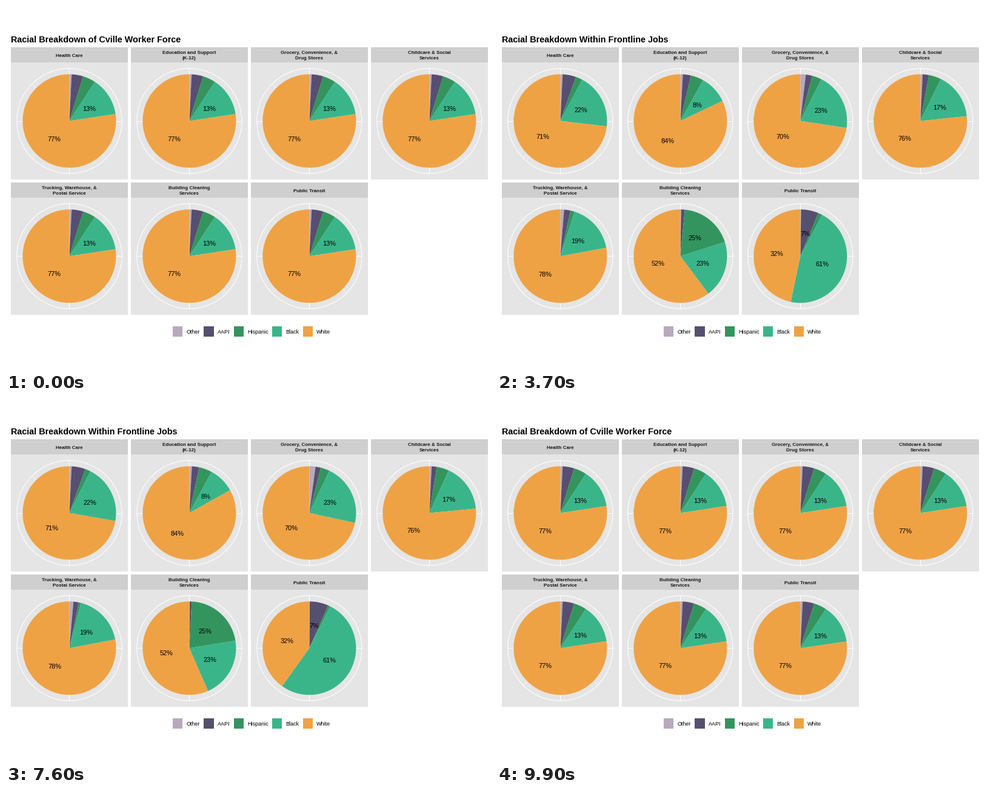
Recreate the animation shown at these times as a matplotlib script. Size 800 px wide and 600 px high, loop 10000 ms.

```python
import numpy as np
import matplotlib.pyplot as plt
from matplotlib.animation import FuncAnimation
from matplotlib.patches import Polygon, Rectangle

plt.rcParams["font.family"] = "Liberation Sans"
PT = 0.72  # points per pixel at 100 dpi

FRAMES, INTERVAL = 100, 100
OUT_START, OUT_END, BACK_START = 16, 50, 67
TITLES = ("Racial Breakdown of Cville Worker Force",
          "Racial Breakdown Within Frontline Jobs")

GROUPS = {"Other": "#b8a9bd", "AAPI": "#574f6f", "Hispanic": "#33955d",
          "Black": "#3ab58a", "White": "#efa244"}
COLORS = list(GROUPS.values())

# Shares in percent for all groups but the last, which takes the rest
OVERALL = (0.8, 4.0, 4.4, 13.4)
JOBS = {
    "Health Care": (0.8, 4.9, 1.35, 21.75),
    "Education and Support\n(K-12)": (0.9, 2.2, 4.5, 8.1),
    "Grocery, Convenience, &\nDrug Stores": (2.4, 1.35, 2.85, 23.0),
    "Childcare & Social\nServices": (0.8, 1.3, 4.2, 17.4),
    "Trucking, Warehouse, &\nPostal Service": (1.55, 1.35, 0, 19.0),
    "Building Cleaning\nServices": (0, 0, 25.2, 22.6),
    "Public Transit": (0, 7.0, 0, 60.7),
}

SIZE, STRIP, GAP = 192.44, 24.9, 5.5
LEFT, TOP = 8.25, 68.4
R_PIE, R_GRID, R_LABEL = 77, 86.6, 38.5
MIN_LABEL = 6

fig = plt.figure(figsize=(8, 6), dpi=100, facecolor="white")
ax = fig.add_axes([0, 0, 1, 1])
ax.set_xlim(0, 800)
ax.set_ylim(600, 0)
ax.axis("off")


def rect(x, y, w, h, color):
    ax.add_patch(Rectangle((x, y), w, h, fc=color, lw=0))


def text(x, y, s, px, **kw):
    return ax.text(x, y, s, fontsize=px * PT, va="baseline", **kw)


def polar(cx, cy, r, share):
    """Points at a share (0..1) of a clockwise turn from the top."""
    a = 2 * np.pi * np.asarray(share)
    return cx + r * np.sin(a), cy - r * np.cos(a)


def sector(cx, cy, start, end):
    x, y = polar(cx, cy, R_PIE, np.linspace(start, end, 90))
    return np.column_stack([np.append(x, cx), np.append(y, cy)])


def bounds(shares):
    return np.array([0, *np.cumsum(shares), 100]) / 100


def percents(edges):
    shares = np.diff(edges) * 100
    return [f"{s:.0f}%" if s >= MIN_LABEL else "" for s in shares]


class Pie:
    def __init__(self, col, row, name, shares):
        x = LEFT + col * (SIZE + GAP)
        y = TOP + row * (SIZE + STRIP + GAP)
        self.cx, self.cy = x + SIZE / 2, y + STRIP + SIZE / 2
        self.edges = bounds(OVERALL), bounds(shares)
        self.words = [percents(e) for e in self.edges]

        rect(x, y, SIZE, STRIP, "#cfcfcf")
        rect(x, y + STRIP, SIZE, SIZE, "#e5e5e5")
        lines = name.split("\n")
        for i, line in enumerate(lines):
            dy = (i - (len(lines) - 1) / 2) * 8.64
            text(self.cx, y + STRIP / 2 + 2.87 + dy, line, 8.05,
                 ha="center", weight="bold", color="#1a1a1a")
        self.draw_grid()
        self.slices = [ax.add_patch(Polygon([(0, 0)] * 3, fc=c, lw=0, zorder=3))
                       for c in COLORS]
        self.labels = [text(0, 0, "", 11.04, ha="center", zorder=4)
                       for _ in COLORS]

    def draw_grid(self):
        for i in range(8):
            x, y = polar(self.cx, self.cy, R_GRID, i / 8)
            width = 0.53 if i % 2 else 1.07
            ax.plot([self.cx, x], [self.cy, y], color="white", lw=width * PT)
        ring = polar(self.cx, self.cy, R_GRID, np.linspace(0, 1, 181))
        ax.plot(*ring, color="white", lw=1.07 * PT)

    def update(self, k):
        a, b = self.edges
        edges = (1 - k) * a + k * b
        return edges

    def draw(self, k, state):
        edges = self.update(k)
        for i, (piece, label) in enumerate(zip(self.slices, self.labels)):
            start, end = edges[i], edges[i + 1]
            piece.set_xy(sector(self.cx, self.cy, start, end))
            x, y = polar(self.cx, self.cy, R_LABEL, (start + end) / 2)
            label.set_position((x, y + 3.9))
            label.set_text(self.words[state][i])


def draw_legend():
    x = 275.1
    widths = (22.5, 20.5, 34.5, 22.0, 23.0)
    for (name, color), w in zip(GROUPS.items(), widths):
        rect(x, 528.2, 16.3, 16.3, color)
        text(x + 22.3, 540, name, 9, ha="left")
        x += w + 28.78


def ease(t):
    return (1 - np.cos(np.pi * t)) / 2


def progress(n):
    """Blend between the two states and the state whose labels show."""
    if n < OUT_END:
        k = ease(max(0, n - OUT_START) / (OUT_END - OUT_START))
        return k, int(k >= 0.5)
    k = ease(max(0, n - BACK_START) / (FRAMES - BACK_START))
    return 1 - k, int(k < 0.5)


title = text(LEFT, 60, TITLES[0], 14.4, ha="left", weight="bold")
pies = [Pie(i % 4, i // 4, name, shares)
        for i, (name, shares) in enumerate(JOBS.items())]
draw_legend()


def draw(n):
    k, state = progress(n)
    title.set_text(TITLES[34 <= n < 85])
    for pie in pies:
        pie.draw(k, state)
    return []


anim = FuncAnimation(fig, draw, frames=FRAMES, interval=INTERVAL,
                     repeat=True, repeat_delay=0, blit=False)
plt.show()
```
